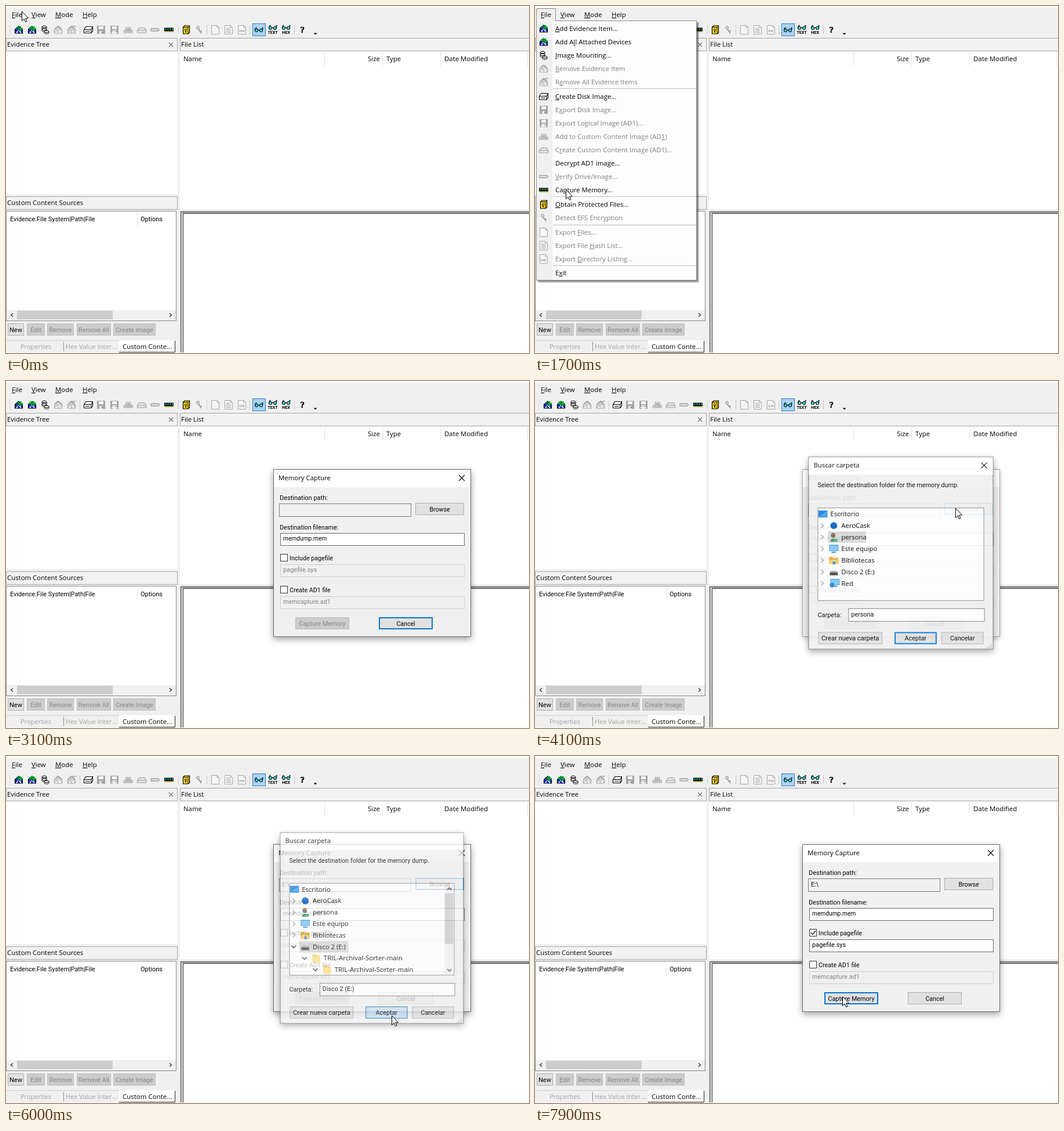
Animation of 902x598 px, one loop 8000 ms. Source, as an HTML page:

```html
<!DOCTYPE html>
<html lang="en">
<head>
<meta charset="utf-8">
<title>Memory capture</title>
<style>
html, body { margin: 0; width: 100%; height: 100%; overflow: hidden; background: #f0f0f0; }
svg { display: block; }
text { white-space: pre; }
.ui { font-family: "Open Sans", "Noto Sans", sans-serif; font-size: 11.4px; }
.dl { font-family: Roboto, "Liberation Sans", sans-serif; font-size: 10.8px; }
</style>
</head>
<body>
<svg width="902" height="598" viewBox="0 0 902 598">
  <defs>
    <filter id="deep" x="-10%" y="-10%" width="120%" height="120%"><feDropShadow dx="0" dy="4" stdDeviation="6" flood-opacity=".38"/></filter>
    <filter id="soft" x="-10%" y="-10%" width="120%" height="120%"><feDropShadow dx="0" dy="2" stdDeviation="4" flood-opacity=".25"/></filter>
    <filter id="drop" x="-10%" y="-10%" width="120%" height="130%"><feDropShadow dx="3" dy="3" stdDeviation="1.3" flood-opacity=".45"/></filter>
    <clipPath id="tree"><rect x="488" y="219" width="286" height="159"/></clipPath>
  </defs>
  <g id="base"></g>
  <g id="live"></g>
</svg>
<script>
const LOOP = 8000, STEP = 100;
const GRAY = '#838383', BLUE = '#0078d7', FACE = '#f0f0f0';

// Drawing helpers
const path = (d, fill = 'none', stroke = 'none', w = 1) =>
  `<path d="${d}" fill="${fill}" stroke="${stroke}" stroke-width="${w}"/>`;
const rect = (x, y, w, h, fill, stroke, line = 1) => stroke
  ? `<rect x="${x + line / 2}" y="${y + line / 2}" width="${w - line}" height="${h - line}" fill="${fill}" stroke="${stroke}" stroke-width="${line}"/>`
  : `<rect x="${x}" y="${y}" width="${w}" height="${h}" fill="${fill}"/>`;
const dot = (x, y, r, fill, stroke = 'none') =>
  `<circle cx="${x}" cy="${y}" r="${r}" fill="${fill}" stroke="${stroke}"/>`;
const at = (x, y, s) => `<g transform="translate(${x} ${y})">${s}</g>`;
const label = (cls, x, y, s, fill = '#000', size = 0, extra = '') =>
  `<text class="${cls}" x="${x}" y="${y}" fill="${fill}" ${size ? `style="font-size:${size}px"` : ''} ${extra}>` +
  s.replace(/&(.)/, '<tspan text-decoration="underline">$1</tspan>') + '</text>';
const ui = (...a) => label('ui', ...a);
const dl = (...a) => label('dl', ...a);
const cross = (x, y, r, color) => path(`M${x - r} ${y - r}L${x + r} ${y + r}M${x + r} ${y - r}L${x - r} ${y + r}`, 'none', color, 1.1);

function button(x, y, w, h, s, mode = '', size = 10.8) {
  const off = mode === 'off';
  const [fill, stroke, line] = {
    off: ['#cccccc', '#bfbfbf', 1], hover: ['#e5f1fb', BLUE, 1],
    main: ['#e1e1e1', BLUE, 2], hot: ['#c6e0f5', '#0067b8', 1]
  }[mode] || ['#e1e1e1', '#adadad', 1];
  return rect(x, y, w, h, fill, stroke, line) +
    dl(x + w / 2, y + h / 2 + 4, s, off ? GRAY : '#000', size, 'text-anchor="middle"');
}

// Icons, centred on 0,0
const house = (line, fill, plus) =>
  path('M-6.5 6V-.5L-1-5.5 2-3.5 6.5 0V6Z', fill, line, 1.2) +
  path('M-5-2L0-6 6-1', 'none', plus, 2) +
  path('M-4 5.5L0 .5 4 5.5', 'none', '#fff', 1.6) + dot(-1, 1, 1.6, '#fff', line);
const plus = path('M3-6V2M-1-2H7', 'none', '#0aa52a', 2.6);
const cyl = (x, y) => path(`M${x - 4} ${y}v2.5c0 2 8 2 8 0V${y}`, '#fff', '#000') +
  `<ellipse cx="${x}" cy="${y}" rx="4" ry="1.7" fill="#fff" stroke="#000"/>`;
const drive = (c, fill) => path('M-7.5-.5L-4-5.5H7.5V2L5 5.5H-7.5ZM-7.5-.5H5L7.5-5M5-.5V5.5', fill, c, 1.1) + path('M-5 2.5H2.5', 'none', c);
const floppy = rect(-7, -7, 14, 14, '#a5a5a5') + rect(-4, -6, 8, 5, '#f5f5f5') + rect(-3, 2, 6, 5, '#e3e3e3') + rect(1, 3, 2, 3, '#8c8c8c');
const page = path('M-6.5-7.5H3L6.5-4V7.5H-6.5ZM3-7.5V-4H6.5', '#f6f6f6', '#a5a5a5');
const specs = dot(-4, 1, 2.7, '#3fd0d6', '#000') + dot(4, 1, 2.7, '#3fd0d6', '#000') +
  path('M-1.3 1Q0-.5 1.3 1M-6.5 0L-5-3.5H-3M6.5 0L7-3.5H5', 'none', '#000', 1.1);
const word = (s, y, c, size) => dl(0, y, s, c, size, 'text-anchor="middle" font-weight="700"');
const icon = {
  add: house('#000', '#1732d8', '#0b7d2c') + plus,
  addAll: house('#000', '#1732d8', '#0aa52a') + plus + dot(-3, -3, 2.3, '#0aa52a'),
  mount: cyl(-2, -5) + cyl(-2, -1) + cyl(2, 3),
  del: house('#a3a3a3', '#dcdcdc', '#a3a3a3'),
  delAll: house('#a3a3a3', '#d4d4d4', '#a3a3a3') + path('M2-6H8', 'none', '#a3a3a3', 1.5),
  disk: drive('#000', '#fff'),
  save: floppy,
  saveAs: floppy + rect(-4, 1, 8, 1, '#f5f5f5') + rect(-5, 4, 10, 2, '#f5f5f5'),
  pack: path('M-4-4H4V3H-4ZM-7.5 1H7V5H-7.5Z', '#dedede', '#a0a0a0', 1.2) + rect(-2, -2, 4, 2, '#a0a0a0'),
  make: path('M-7.5 1L-4-3.5H5L7.5 1V5H-7.5ZM-7.5 1H7.5', '#e6e6e6', '#a0a0a0', 1.2),
  verify: path('M-7-2H5.5L7.5 0 5.5 2H-7Z', '#e3e3e3', '#a0a0a0', 1.3),
  ram: rect(-8, -3.5, 16, 6, '#000') + [-6.5, -2.5, 1.5, 5.5].map(x => rect(x, -2.5, 2, 3, '#22b6a4')).join('') + path('M-7 3.2H8', 'none', '#c6ad26', 1.5),
  book: path('M-5.5-4.5L-3-7H5.5V5L3 7H-5.5Z', '#ffd91c', '#000', 1.2) + path('M-5.5-4.5H3V7M3-4.5L5.5-7', 'none', '#000') + dot(-1, 0, 1.6, '#fff', '#000') + path('M-1 2V5', 'none', '#000', 1.4),
  key: dot(-2, -3.5, 2.7, '#d0d0d0', '#9b9b9b') + path('M-1-1L4 6M2 3L4.5 1.5', 'none', '#9b9b9b', 2),
  page,
  list: page + path('M-4-3H2M-4-.5H4M-4 2H4M-4 4.5H4', 'none', '#a5a5a5'),
  dir: page + word('DIR', 3.5, '#a0a0a0', 6),
  specs,
  text: at(0, -4, specs) + word('TEXT', 6.5, '#000', 7),
  hex: at(0, -4, specs) + word('HEX', 6.5, '#000', 7.4)
};

const tools = [[22, 'add'], [45, 'addAll'], [68, 'mount'], [90, 'del'], [113, 'delAll'], [142, 'disk'], [164, 'save'],
  [187, 'saveAs'], [211, 'pack'], [234, 'make'], [257, 'verify'], [281, 'ram'], [311, 'book'], [333, 'key'],
  [361, 'page'], [384, 'list'], [407, 'dir'], [436, 'specs'], [460, 'text'], [483, 'hex']];

function windowBase() {
  const head = (x, y, w, s) => rect(x, y, w, 23, '#f2f2f2', '#a5a5a5') + ui(x + 2, y + 15, s);
  let s = rect(0, 0, 902, 598, FACE) + rect(0, 0, 902, 3, '#fff');
  s += ui(10, 19, '&File') + ui(44, 19, '&View') + ui(85, 19, '&Mode') + ui(132, 19, '&Help');
  for (let y = 33; y < 50; y += 3) s += rect(6, y, 2, 1, '#c4c4c4');
  [127, 297, 346, 420, 497].forEach(x => s += rect(x, 33, 1, 16, '#c6c6c6'));
  s += rect(425, 30, 23, 22, '#a9d3f5', '#2c7cc4');
  tools.forEach(([x, k]) => s += at(x, 41, icon[k]));
  s += `<text x="507.5" y="46" font-family="Liberation Serif, serif" font-size="15" font-weight="700" stroke="#000" stroke-width=".5">?</text>`;
  s += path('M530.5 46.5H536.5L533.5 49.5Z', '#000');
  // left column
  s += rect(0, 78, 296, 246, '#fff') + head(0, 55, 296, 'Evidence Tree') + cross(284.5, 66.5, 3.5, '#666');
  s += head(0, 328, 296, 'Custom Content Sources') + rect(0, 353, 294, 190, '#fff', '#828790');
  s += rect(226, 355, 1, 24, '#e5e5e5') + dl(7, 371, 'Evidence:File System|Path|File', '#000', 10.9) + dl(232, 371, 'Options', '#000', 11);
  s += rect(1, 524, 292, 18, FACE) + rect(19, 525, 165, 15, '#cdcdcd');
  s += path('M12 529.5L8.5 532.5 12 535.5M282 529.5L285.5 532.5 282 535.5', 'none', '#444', 1.6);
  s += button(3, 547, 28, 21, 'New', '', 11) + button(36, 547, 31, 21, 'Edit', 'off', 11) + button(71, 547, 46, 21, 'Remove', 'off') +
    button(122, 547, 59, 21, 'Remove All', 'off', 10.6) + button(185, 547, 73, 21, 'Create Image', 'off', 10.9);
  s += rect(0, 576, 195, 1, '#d0d0d0') + rect(99, 579, 1, 16, '#8a8a8a') + rect(195, 576, 97, 21, '#fff');
  s += path('M195 596.5H291.5V577', 'none', '#222') + rect(0, 597, 902, 1, '#f8f8f8');
  s += ui(25, 591, 'Properties', '#a0a0a0', 11) + ui(103, 591, 'Hex Value Inter...', '#a0a0a0', 11.2) + ui(201, 591, 'Custom Conte...', '#000', 11.5);
  // right column
  s += rect(300, 78, 602, 272, '#fff') + head(300, 55, 604, 'File List');
  [549, 649, 749, 899].forEach(x => s += rect(x, 79, 1, 24, '#e5e5e5'));
  s += ui(306, 95, 'Name') + ui(624, 95, 'Size') + ui(656, 95, 'Type') + ui(756, 95, 'Date Modified');
  s += rect(301, 355, 601, 242, '#b5b5b5') + path('M301.5 597V354.5H902', 'none', '#696969', 1.4) +
    rect(303, 356, 2, 241, '#e6e6e6') + rect(305, 357, 597, 240, '#fff') + path('M305.5 597V357.5H902', 'none', '#555', 1.4);
  return s;
}

const items = [
  [39, 'add', '&Add Evidence Item...', 1], [62, 'addAll', 'Add A&ll Attached Devices', 1], [85, 'mount', '&Image Mounting...', 1],
  [108, 'del', '&Remove Evidence Item'], [131, 'delAll', 'R&emove All Evidence Items'], [156, 'disk', '&Create Disk Image...', 1],
  [179, 'save', 'E&xport Disk Image...'], [202, 'saveAs', 'Export Logical Image (AD1)...'], [225, 'pack', 'Add to Custom Content Image (AD&1)'],
  [248, 'make', 'C&reate Custom Content Image (AD1)...'], [271, '', 'Decr&ypt AD1 image...', 1], [294, 'verify', '&Verify Drive/Image...'],
  [317, 'ram', 'Ca&pture Memory...', 1], [342, 'book', '&Obtain Protected Files...', 1], [365, 'key', 'Detect EFS Encr&yption'],
  [390, 'page', 'Export &Files...'], [413, 'list', 'Export File &Hash List...'], [436, 'dir', 'Export &Directory Listing...'], [460, '', 'E&xit', 1]
];

function menu(t) {
  let s = `<g filter="url(#drop)">${rect(2, 25, 277, 448, '#fdfdfd', '#8c8c8c')}</g>` + rect(3, 26, 27, 446, FACE);
  s += path('M2.5 26V4.5H35.5V25.5', FACE, '#8c8c8c') + rect(3, 25, 32, 1, FACE) + ui(10, 19, '&File');
  [142, 328, 377, 447].forEach(y => s += rect(31, y, 247, 1, '#bdbdbd'));
  if (t >= 1800) s += rect(4, 306, 273, 22, '#b9daf4', '#2c7cc4');
  items.forEach(([y, k, name, on]) => s += (k ? at(15, y, icon[k]) : '') + ui(35, y + 4, name, on ? '#000' : '#7d7d7d', 11.45));
  return `<g opacity="${Math.min(1, .5 + (t - 600) / 220)}">${s}</g>`;
}

function check(y, s, on, hot) {
  return rect(473, y, 13, 13, '#fff', hot ? BLUE : '#333') +
    (on ? path(`M475.5 ${y + 6.5}L478.5 ${y + 9.5} 484 ${y + 3.5}`, 'none', hot ? BLUE : '#222', 1.3) : '') + dl(489, y + 11, s, '#000', 10.7);
}
const field = (y, s, on, size) => rect(473, y, 318, 22, on ? '#fff' : FACE, on ? '#6a6a6a' : '#cccccc') + dl(478, y + 13, s, on ? '#000' : GRAY, size);

function frame(x, y, w, h, title, active) {
  return `<g filter="url(#${active ? 'deep' : 'soft'})">${rect(x, y, w, h, FACE, active ? '#6c6c6c' : '#a6a6a6')}</g>` +
    rect(x + 1, y + 1, w - 2, 30, '#fff') + ui(x + 9, y + 19, title, active ? '#000' : '#999');
}

function memory(t) {
  const active = t < 4000 || t >= 6000, path1 = t >= 5900, paged = t >= 7300;
  const browse = t >= 3300 && t < 3900 ? 'hover' : t >= 3900 && !paged ? 'main' : '';
  return frame(461, 152, 341, 289, 'Memory Capture', active) + cross(786, 167, 5, active ? '#000' : '#999') +
    dl(472, 205, 'Destination path:', '#000', 11) + rect(471, 211, 228, 23, FACE, '#7a7a7a') + (path1 ? dl(476, 225, 'E:\\') : '') +
    button(706, 210, 84, 21, 'Browse', browse, 10.6) +
    dl(472, 256, 'Destination filename:') + field(262, 'memdump.mem', true, 10.2) +
    check(298, 'Include pagefile', paged, t >= 6900 && t < 7600) + field(316, 'pagefile.sys', paged, 11) +
    check(353, 'Create AD1 file', false, t === 7800) + field(371, 'memcapture.ad1', false, 10.8) +
    button(499, 407, 93, 21, 'Capture Memory', paged ? 'main' : t >= 6100 ? '' : 'off') +
    button(643, 407, 93, 21, 'Cancel', t < 3900 ? 'main' : '', 10.6);
}

const folder = path('M-6.5-7H0L1-5H6.5V7H-6.5Z', '#fbd66b') + path('M-6.5-3H6.5V7H-6.5Z', '#ffe08a');
const screen = rect(-8, -7, 16, 11, '#4a9fe0') + rect(-7, -6, 14, 9, '#7cc6f7') + rect(-4, 5, 8, 2, '#4a87b5');
const art = [
  rect(-8, -6, 16, 12, '#1e82dc') + path('M-7 5L7-5V5Z', '#3fa4f2'),
  dot(0, 0, 6, '#0a66c9'),
  path('M-6 8C-6 1 5 1 5 8Z', '#3f9b6b') + dot(-1, -3, 4, '#7d6654') + rect(1, 3, 5, 5, '#56b884'),
  screen,
  path('M-8-6H-2L-1-4H8V6H-8Z', '#f4b93d') + rect(-6, -1, 12, 8, '#ffd773') + rect(-2, 2, 5, 5, '#3f8fd2'),
  path('M-7 1L-5-2H5L7 1Z', '#b9b9b9') + rect(-7, 1, 14, 5, '#454545') + rect(4, 3, 2, 1, '#62d46a'),
  at(2, -1, screen) + dot(-3, 3, 4, '#2c7fcb')
];
const names = ['Escritorio', 'AeroCask', 'persona', 'Este equipo', 'Bibliotecas', 'Disco 2 (E:)', 'Red'];

function tree(t, open) {
  const arrow = (x, y, down) => down ? path(`M${x - 4} ${y - 2}l4 4 4-4`, 'none', '#333', 1.4) : path(`M${x - 2} ${y - 4}l4 4-4 4`, 'none', '#999', 1.3);
  const hot = t < 5400;
  let s = open
    ? rect(505, 319, 85, 20, hot ? '#cce8ff' : '#d9d9d9', hot ? '#99d1ff' : '#d9d9d9')
    : rect(505, 259, 66, 20, '#d9d9d9');
  names.forEach((name, i) => {
    const y = 229 + i * 20;
    if (open && i === 6) return;
    s += at(i ? 515 : 496, y, art[i]) + ui(i ? 528 : 509, y + 4, name);
    if (i) s += arrow(495, y, open && i === 5);
  });
  if (open) {
    [0, 1].forEach(i => s += arrow(513.5 + 19 * i, 349 + 20 * i, true) + at(534 + 19 * i, 349 + 20 * i, folder) +
      ui(547 + 19 * i, 353 + 20 * i, 'TRIL-Archival-Sorter-main', '#000', 11.6));
    s += rect(758, 219, 16, 159, FACE) + rect(758, 236, 15, 88, '#cdcdcd') +
      path('M762.5 230L766 226.5 769.5 230M762.5 368L766 371.5 769.5 368', 'none', '#444', 1.6);
  }
  return `<g clip-path="url(#tree)">${s}</g>`;
}

function picker(t) {
  const open = t >= 4700;
  const p = Math.min(1, (t - 3900) / 220), q = Math.max(0, (t - 5900) / 300);
  const scale = .97 + .03 * p - .03 * q, alpha = p * Math.max(0, 1 - 2 * q * q);
  let s = frame(471, 130, 320, 333, 'Buscar carpeta', true) + (q ? '' : cross(775, 145, 5, '#000')) +
    dl(487, 183, 'Select the destination folder for the memory dump.') +
    rect(487, 218, 288, 161, '#fff', '#828790') + tree(t, open) +
    dl(487, 407, 'Carpeta:', '#000', 11) + rect(540, 392, 236, 23, '#fff', '#7a7a7a') + dl(545, 406, open ? names[5] : names[2], '#000', 10.9) +
    button(488, 433, 111, 21, 'Crear nueva carpeta', '', 11.2) + button(620, 433, 73, 21, 'Aceptar', t >= 5700 ? 'hot' : 'main', 10.9) +
    button(701, 433, 73, 21, 'Cancelar');
  for (let i = 0; i < 3; i++) for (let j = 0; j <= i; j++) s += rect(786 - 3 * j, 453 + 3 * i - 0, 2, 2, '#bdbdbd');
  return `<g opacity="${alpha}" transform="translate(631 296.5) scale(${scale}) translate(-631 -296.5)">${s}</g>`;
}

const tip = () => `<g filter="url(#drop)">${rect(552, 348, 156, 35, '#fff', '#767676')}</g>` +
  ui(558, 362, 'Espacio disponible: 59,3 GB', '#575757', 11.2) + ui(558, 377, 'Tamaño total: 59,9 GB', '#575757', 11.2);

// Pointer track: time, x, y
const track = [[0, 27, 9], [100, 28, 15], [200, 28, 15], [300, 21, 15], [600, 21, 15], [1400, 46, 257], [1700, 53, 316], [2000, 55, 326],
  [2300, 55, 326], [3000, 600, 262], [3300, 718, 226], [3700, 725, 219], [4100, 725, 219], [4600, 555, 327], [5100, 555, 327],
  [5700, 665, 447], [6000, 665, 447], [6900, 486, 300], [7100, 482, 303], [7400, 482, 303], [7800, 481, 360], [7900, 530, 414]];

function pointer(t) {
  if (t >= 2900 && t <= 3100) return '';
  let i = track.findIndex(k => k[0] > t) - 1;
  if (i < 0) i = track.length - 2;
  const [a, b] = [track[i], track[i + 1]];
  const u = Math.min(1, (t - a[0]) / (b[0] - a[0])), e = u * u * (3 - 2 * u);
  const shape = t >= 4500 && t <= 5200
    ? path('M-1.5 10V1Q0-1.5 1.5 1V7Q3 5 4.5 7 6 5.8 7.5 7.6 9.5 6.5 10.5 9V13Q10 16 8.5 19H1Q-1 15-4.5 12 -5.5 9.5-3 9.5Z', '#fff', '#000', 1.1) + path('M4.5 7V10.5M7.5 7.6V10.5', 'none', '#000')
    : path('M.5.5V16.5L4.2 13 6.7 18.5 9 17.5 6.6 12.2H11.5Z', '#fff', '#000');
  return at((a[1] + (b[1] - a[1]) * e).toFixed(1), (a[2] + (b[2] - a[2]) * e).toFixed(1), shape);
}

function scene(t) {
  let s = '';
  if (t >= 100 && t < 600) s += rect(2, 4, 34, 21, '#cfe6f8', '#5a9fd6') + ui(10, 19, '&File');
  if (t >= 600 && t < 2400) s += menu(t);
  if (t >= 2500) {
    const p = Math.min(1, (t - 2400) / 220);
    s += `<g opacity="${p}" transform="translate(631 296.5) scale(${.97 + .03 * p}) translate(-631 -296.5)">${memory(t)}</g>`;
  }
  if (t >= 4000 && t < 6200) s += picker(t);
  if (t >= 4900 && t < 5400) s += tip();
  return s + pointer(t);
}

const live = document.getElementById('live');
document.getElementById('base').innerHTML = windowBase();
let last = -1;
function draw(now) {
  const t = Math.floor(now % LOOP / STEP) * STEP;
  if (t !== last) live.innerHTML = scene(last = t);
  requestAnimationFrame(() => draw(performance.now()));
}
draw(0);
</script>
</body>
</html>
```
